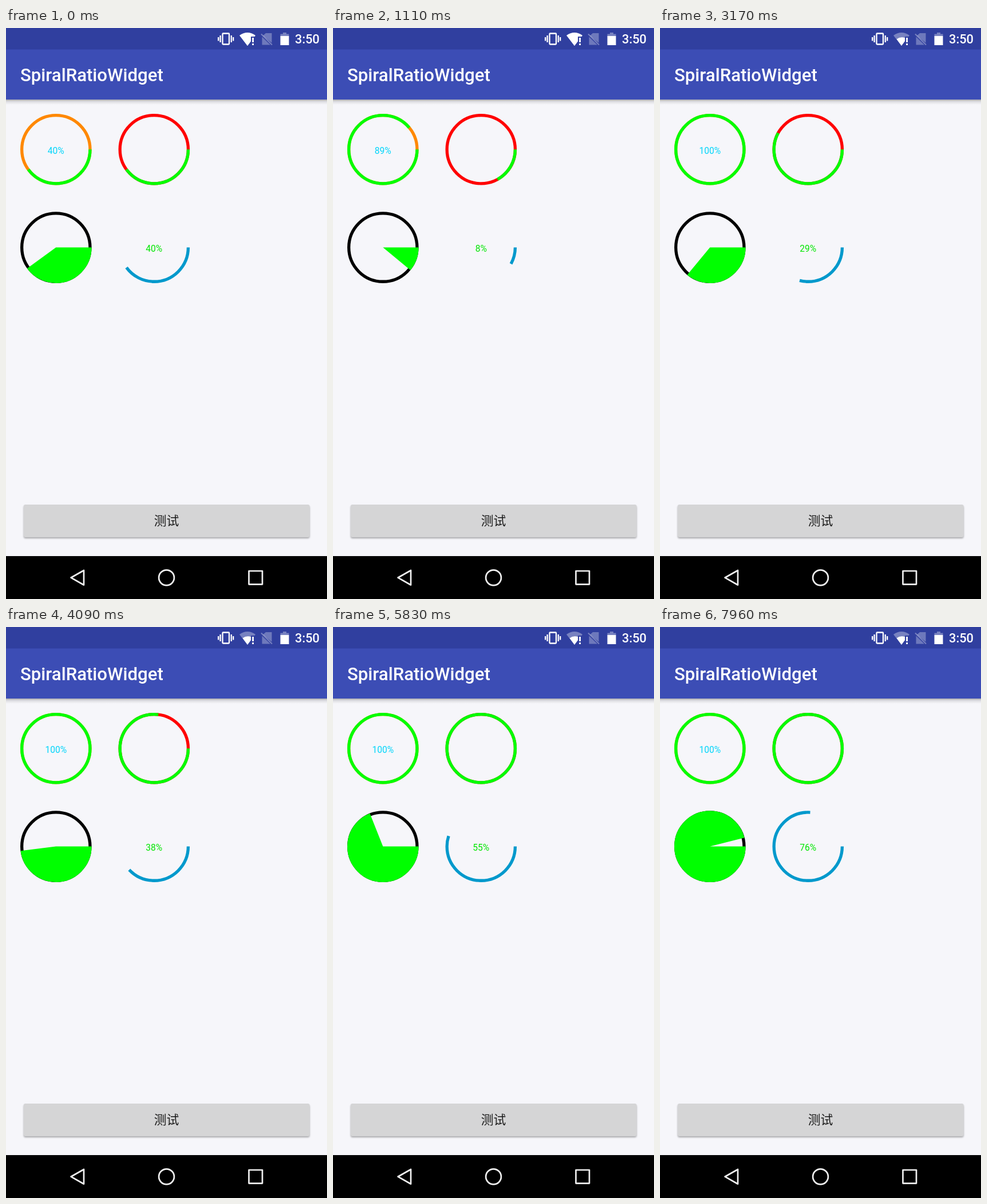
Animation of 561 by 998 pixels, one loop 7.99 s. Source, as an HTML page:

```html
<!DOCTYPE html>
<html lang="en">
<head>
<meta charset="utf-8">
<title>Ring gauges</title>
<style>
  html, body { margin: 0; width: 100%; height: 100%; overflow: hidden; background: #f6f6fa; }
  svg { display: block; width: 561px; height: 998px; font-family: Roboto, sans-serif; }
  .medium { font-weight: 500; fill: #fff; }
  .label { font-size: 15.6px; text-anchor: middle; }
</style>
</head>
<body>
<svg viewBox="0 0 561 998">
  <defs>
    <linearGradient id="shade" x2="0" y2="1">
      <stop stop-color="#000" stop-opacity=".3"/>
      <stop offset=".4" stop-color="#000" stop-opacity=".1"/>
      <stop offset="1" stop-color="#000" stop-opacity="0"/>
    </linearGradient>
    <filter id="blur" x="-5%" y="-20%" width="110%" height="140%"><feGaussianBlur stdDeviation="1.5"/></filter>
  </defs>

  <rect width="561" height="998" fill="#f6f6fa"/>
  <rect y="125" width="561" height="9" fill="url(#shade)"/>
  <rect y="37" width="561" height="88" fill="#3c4db5"/>
  <rect width="561" height="37.5" fill="#303f9f"/>
  <text class="medium" x="25" y="93" font-size="31.17">SpiralRatioWidget</text>

  <!-- status icons -->
  <g fill="none" stroke="#fff" stroke-width="2.3">
    <rect x="378.5" y="9.5" width="11.5" height="19" rx="1"/>
    <path d="M374.6 13v12M371.2 16v6.5M393.8 13v12M397.2 16v6.5"/>
  </g>
  <path id="fan" d="M408 13Q422 3 436 13L434.5 15H428V23L422 31Z" fill="#fff"/>
  <path d="M413.5 19.5Q420 14.5 428 17V23L422 31Z" fill="#fff"/>
  <path d="M430.2 17h2.8v8h-2.8zM430.2 27h2.8v3h-2.8z" fill="#fff"/>
  <path d="M454 9H464.5V26L449 13.5ZM447.5 15.5L462 29.5H447.5Z" fill="#fff" opacity=".3"/>
  <path d="M446 10.5L465 29.5" stroke="#fff" stroke-width="2" opacity=".35"/>
  <path d="M484 8h6v2.5h4.5v4h-15v-4h4.5z" fill="#fff" opacity=".35"/>
  <path d="M479.5 14h15v16h-15z" fill="#fff"/>
  <text class="medium" x="505" y="27.3" font-size="21.8">3:50</text>

  <g id="gauges"></g>

  <rect x="31" y="835" width="499.5" height="57" rx="3" opacity=".32" filter="url(#blur)"/>
  <rect x="31" y="833" width="499.5" height="57" rx="3" fill="#d5d5d6"/>
  <text x="280.5" y="869" font-size="21.8" text-anchor="middle" fill="#1c1c1c"
        font-family="'Noto Sans CJK SC', 'Noto Sans CJK', sans-serif">测试</text>

  <rect y="923" width="561" height="75"/>
  <g fill="none" stroke="#f0f0f0" stroke-width="2.7" stroke-linejoin="round">
    <path d="M113.5 960.7L136 948V973.5Z"/>
    <circle cx="280.5" cy="960.7" r="13.4"/>
    <rect x="424.5" y="949" width="23.5" height="23.3"/>
  </g>
</svg>
<script>
const LOOP = 7990, INITIAL = 40, WIFI_DROP = 2200;
const RADIUS = 62.3, LINE = 5.3;

// start: time of the reset; step: ms per percent
const gauges = [
  { x: 87.3, y: 212.2, track: '#ff8800', bar: '#00ff00', text: '#00d5fa', start: 208, step: 10.05 },
  { x: 258.8, y: 212.2, track: '#ff0000', bar: '#00ff00', start: 208, step: 50.4 },
  { x: 87.3, y: 383.6, track: '#000', bar: '#00ff00', pie: true, start: 208, step: 80.5 },
  { x: 258.8, y: 383.6, bar: '#0099cc', text: '#00e600', start: 228, step: 100.6 }
];
const layer = document.getElementById('gauges');
const fan = document.getElementById('fan');

function add(tag, attributes) {
  const node = document.createElementNS('http://www.w3.org/2000/svg', tag);
  for (const name in attributes) node.setAttribute(name, attributes[name]);
  return layer.appendChild(node);
}

function ring(g, color, width) {
  return add('circle', {
    cx: g.x, cy: g.y, r: RADIUS - width / 2, fill: 'none',
    stroke: color, 'stroke-width': width, pathLength: 100
  });
}

for (const g of gauges) {
  if (g.track) ring(g, g.track, LINE);
  g.arc = ring(g, g.bar, g.pie ? RADIUS : LINE);
  if (g.text) g.label = add('text', { class: 'label', x: g.x, y: g.y + 7.8, fill: g.text });
}

function draw(time) {
  const t = time % LOOP;
  for (const g of gauges) {
    const percent = t < g.start ? INITIAL : Math.min(100, Math.floor((t - g.start) / g.step));
    g.arc.setAttribute('stroke-dasharray', percent < 100 ? `${percent} 200` : 'none');
    g.arc.setAttribute('visibility', percent ? 'visible' : 'hidden');
    if (g.label) g.label.textContent = percent + '%';
  }
  fan.setAttribute('opacity', t < WIFI_DROP ? 1 : 0.35);
}

const origin = performance.now();
function tick() {
  draw(performance.now() - origin);
  requestAnimationFrame(tick);
}
tick();
</script>
</body>
</html>
```
